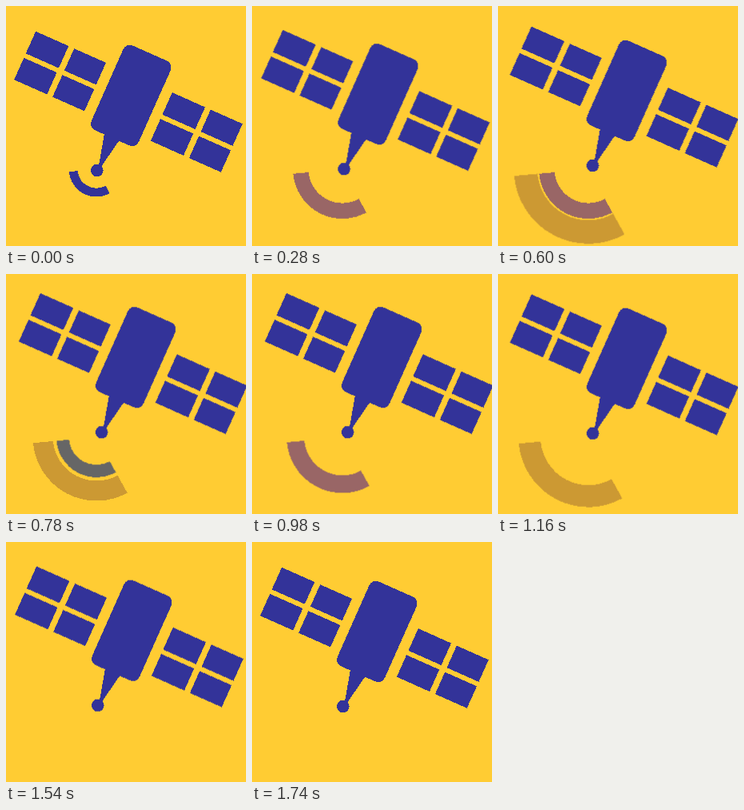
Animation, 300 px wide and 300 px high, one loop 1780 ms. Source, as an HTML page without scripts:

```html
<!DOCTYPE html>
<html lang="en">
<head>
<meta charset="utf-8">
<title>Satellite</title>
<style>
  :root { --loop: 1780ms; }
  html, body { margin: 0; width: 100%; height: 100%; overflow: hidden; background: #fc3; }
  svg { display: block; width: 100%; height: 100%; shape-rendering: crispEdges; }

  .satellite { fill: #339; animation: drift var(--loop) cubic-bezier(.37, 0, .63, 1) infinite; }
  @keyframes drift {
    0%, 100% { transform: translate(0, 0); }
    50% { transform: translate(6px, -8px); }
  }

  /* Each wave lives 700ms; its fade runs in flat colour steps. */
  .wave {
    fill: none;
    stroke-width: 10.8;
    transform-origin: 0 0;
    animation: grow var(--loop) linear infinite, fade var(--loop) step-end infinite;
  }
  .second { animation-delay: -1460ms; }
  .third { animation-delay: -1160ms; }
  @keyframes grow {
    0% { transform: scale(1); }
    39.326%, 100% { transform: scale(3); }
  }
  @keyframes fade {
    0% { stroke: #339; }
    6.2% { stroke: #666; }
    15.2% { stroke: #966; }
    24.2% { stroke: #c93; }
    35.4%, 100% { stroke: transparent; }
  }
</style>
</head>
<body>
<svg viewBox="0 0 300 300">
  <defs>
    <path id="arc" d="M-28.78 2.62A28.9 28.9 0 0 0 14.01 25.28"/>
    <path id="panel" d="M0 0h45v30.2h-45zM52.6 0h43.6v30.2h-43.6zM0 36.2h45v30h-45zM52.6 36.2h43.6v30h-43.6z"/>
  </defs>

  <g transform="translate(113 204)">
    <use href="#arc" class="wave"/>
    <use href="#arc" class="wave second"/>
    <use href="#arc" class="wave third"/>
  </g>

  <g class="satellite">
    <g transform="rotate(24)">
      <use href="#panel" x="46.8" y="13.9"/>
      <use href="#panel" x="233.8" y="14.3"/>
      <rect x="155.9" y="-19.2" width="64.8" height="115.8" rx="9"/>
    </g>
    <path d="M123.6 156L143 166L118.5 201.5L115.8 200.5z"/>
    <circle cx="113.8" cy="205.5" r="7.8"/>
  </g>
</svg>
</body>
</html>
```
